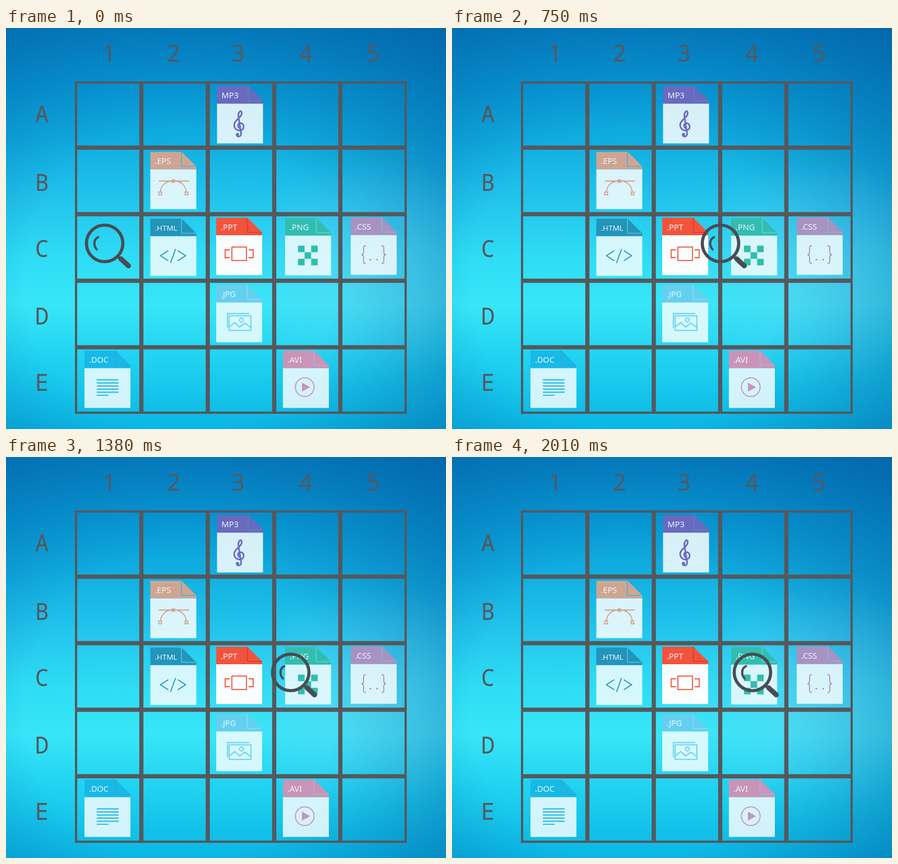
Write an HTML page that moves like this. It is 785 by 714 pixels and loops after 2.14 s.

```html
<!DOCTYPE html>
<html lang="en">
<head>
<meta charset="utf-8">
<title>File lookup</title>
<style>
  html, body { margin: 0; width: 100%; height: 100%; overflow: hidden; }
  body {
    background:
      radial-gradient(ellipse 240px 200px at 650px 430px, rgba(130, 195, 235, .34), rgba(130, 195, 235, 0)),
      radial-gradient(circle at 310px 450px, rgba(0, 85, 155, 0) 42%, rgba(0, 85, 155, .62) 100%),
      linear-gradient(#0786c6, #089ad6 14%, #10ade0 28%, #22c4ec 43%, #2edcf4 57%, #38e6f8 69%, #1ed0f0 84%, #0ab6e3);
  }
  svg { display: block; width: 100%; height: 100%; }
  .labels text { font: 41px "Noto Sans", "Open Sans", sans-serif; fill: #56585c; text-anchor: middle; }
  .labels .row { font-family: "Noto Sans Mono", "DejaVu Sans Mono", monospace; }
  .grid { fill: none; stroke: #55585c; }
  .tag { font: 14.5px "Noto Sans", "Open Sans", sans-serif; fill: #e8f6fc; }
  .art { fill: none; stroke-width: 1.8; }
  .art .solid { stroke: none; }
  #glass { fill: none; stroke: #484d54; }
</style>
</head>
<body>
<svg viewBox="0 0 785 714" preserveAspectRatio="none">
  <g class="labels" id="labels"></g>
  <g class="grid">
    <rect x="125" y="97" width="588" height="588" stroke-width="4"/>
    <path stroke-width="7.4" d="M241.5 97V685M360 97V685M478.5 97V685M596.5 97V685M125 213H713M125 331.5H713M125 450H713M125 568.5H713"/>
  </g>
  <g id="files"></g>
  <g id="glass">
    <circle r="32.5" stroke-width="5.6"/>
    <path d="M-11.500 -11C-19 -8 -21 3 -14 11" stroke-width="4" stroke-linecap="round"/>
    <path d="M23 23L31 30" stroke-width="5"/>
    <path d="M29 27.500L42.500 40" stroke-width="9" stroke-linecap="round"/>
  </g>
</svg>
<script>
const solid = (shape, color) => shape.replace('/>', ` class="solid" fill="${color}"/>`);
const path = d => `<path d="${d}"/>`;
const rect = (x, y, w, h = w) => `<rect x="${x}" y="${y}" width="${w}" height="${h}"/>`;
const circle = (x, y, r) => `<circle cx="${x}" cy="${y}" r="${r}"/>`;

const art = {
  clef: c => '<g stroke-width="2.8" stroke-linecap="round">' +
    path('M40 75C36 72 37 66 42 66C49 66 50 78 41 79C31 79 28 69 33 63C37 57 45 54 44 47C43 42 39 45 38 51C38 57 42 75 43 84C43 91 36 91 35 87') +
    '</g>' + solid(circle(36.5, 86, 2.8), c),
  curve: c => path('M15 52H69M18 71C20 45 62 45 64 71') +
    rect(15, 71.5, 5) + rect(62, 71.5, 5) + solid(rect(38, 49, 6), c),
  code: () => path('M32 57L18 66L32 75M45 54L36 79M49 57L63 66L49 75'),
  slide: () => rect(28, 52, 26, 24) + path('M24 57H16V71H24M58 57H66V71H58'),
  checks: c => [0, 2, 4, 6, 8].map(i =>
    solid(rect(23 + i % 3 * 11.7, 49 + Math.floor(i / 3) * 11.7, 11.7), c)).join(''),
  braces: c => path('M27 50c-5 0-4 3-4 8s0 8-4 8c4 0 4 3 4 8s-1 8 4 8M55 50c5 0 4 3 4 8s0 8 4 8c-4 0-4 3-4 8s1 8-4 8') +
    solid(circle(35, 75, 1.6), c) + solid(circle(47, 75, 1.6), c),
  photo: () => rect(23, 55, 39, 26) + circle(45, 62.5, 3.5) +
    path('M20 77V51H59M23 75L33 67L42 75L51 68L62 76'),
  lines: () => path('M22 52H61M22 57.500H61M22 63H61M22 68.500H61M22 74H61M22 79.300H43'),
  play: c => circle(39, 65, 16.7) + solid(path('M34 57V73L48.500 65Z'), c)
};

// name, x, y, header, drawing, fold line, body opacity
const files = [
  ['MP3', 376.5, 103.5, '#6a69bf', 'clef', '#4a8fbd', .84],
  ['.EPS', 257.5, 220.5, '#cfa592', 'curve', '#45b4d8', .84],
  ['.HTML', 257.5, 339.5, '#2394ba', 'code', '#4cc3de', .8],
  ['.PPT', 375, 338, '#f4533b', 'slide', '#c9403c', .98],
  ['.PNG', 498, 338.5, '#32bdb0', 'checks', '#5fd3d0', .8],
  ['.CSS', 615, 337.5, '#a992c2', 'braces', '#7fb8dc', .8],
  ['.JPG', 375, 457.5, '#64d0f0', 'photo', '#84dcf4', .8],
  ['.DOC', 140, 574.5, '#17b9e6', 'lines', '#3d9fd3', .81],
  ['.AVI', 494, 574.5, '#c994b8', 'play', '#a8b4d8', .81]
];

function drawFile([name, x, y, color, kind, fold, opacity]) {
  const size = name === '.HTML' ? 'style="font-size:13.4px"' : '';
  return `<g transform="translate(${x} ${y})">
    <path d="M0 31H82V102H0Z" fill="#fff" fill-opacity="${opacity}"/>
    <path d="M0 0H56L82 26V31H0Z" fill="${color}"/>
    <path d="M55.500 0V26H81" fill="none" stroke="${fold}" stroke-width="1.6"/>
    <text class="tag" x="8" y="21.500" ${size}>${name}</text>
    <g class="art" stroke="${color}">${art[kind](color)}</g>
  </g>`;
}

const label = (s, x, y, kind) => `<text class="${kind}" x="${x}" y="${y}">${s}</text>`;
document.getElementById('labels').innerHTML =
  [184, 299, 414, 535, 655].map((x, i) => label(i + 1, x, 59.5, 'col')).join('') +
  [168, 290, 408, 527.5, 646].map((y, i) => label('ABCDE'[i], 64, y, 'row')).join('');
document.getElementById('files').innerHTML = files.map(drawFile).join('');

// The glass rests in C1, then jumps along row C at a fixed beat.
const REST = 260, BEAT = 70, LOOP = 2140;
const stops = [
  176, 270, 630, 536, 421, 308, 203, 593, 479,
  365, 260, 626, 508, 394, 294, 190, 630, 508,
  402, 304, 203, 593, 486, 387, 280, 630, 536
];
const glass = document.getElementById('glass');

function draw() {
  const t = performance.now() % LOOP;
  const beat = t < REST ? 0 : 1 + Math.floor((t - REST) / BEAT);
  const x = stops[Math.min(beat, stops.length - 1)];
  glass.setAttribute('transform', `translate(${x} 383.5)`);
  requestAnimationFrame(draw);
}
draw();
</script>
</body>
</html>
```
